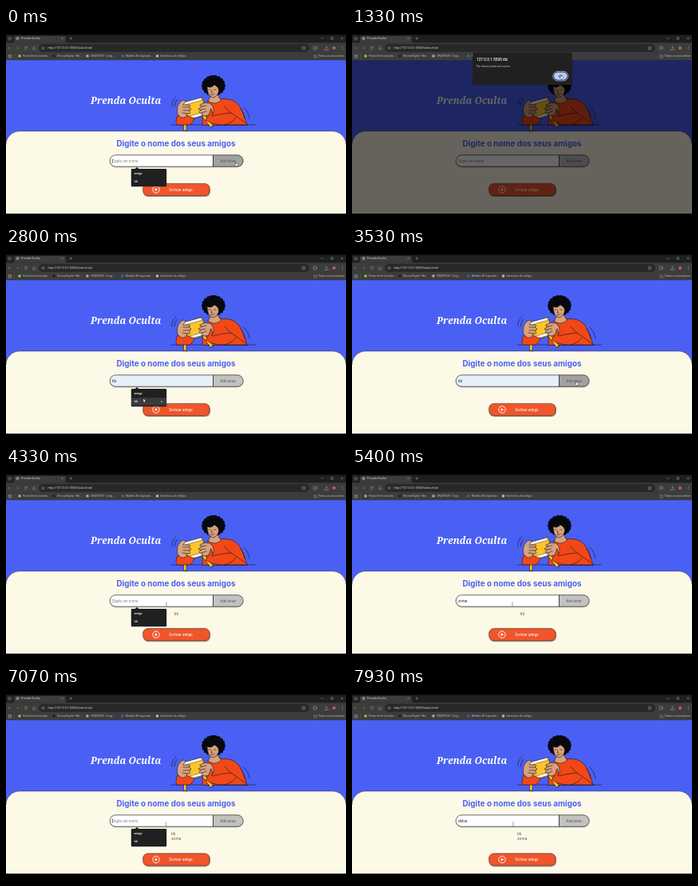
An HTML page for the animation above (8000 ms loop, 426 by 240 pixels).

```html
<!DOCTYPE html>
<html lang="pt-BR">
<head>
<meta charset="utf-8">
<title>Prenda Oculta</title>
<style>
html, body { margin: 0; width: 100%; height: 100%; overflow: hidden; background: #000; }
svg { display: block; width: 100%; height: 100%; }
text { font-family: Inter, sans-serif; font-size: 4.4px; white-space: pre; }
.chrome text { font: 3.4px Roboto, sans-serif; fill: #bdbdbd; }
.chrome .title { font-size: 3.8px; fill: #d4d4d4; }
.chrome .url { font-size: 3.85px; fill: #d8d8d8; }
.icons { fill: none; stroke: #a4a4a4; stroke-width: .5; }
.art { stroke: #15151f; stroke-width: .6; stroke-linejoin: round; stroke-linecap: round; }
.line { fill: none; }
.small { font: 600 3.6px Roboto, sans-serif; fill: #e4e4e4; }
</style>
</head>
<body>
<svg viewBox="0 0 426 240">
  <rect width="426" height="240"/>

  <g id="page">
    <rect y="40" width="426" height="192" fill="#4a60f4"/>
    <path d="M0 232V146A17 17 0 0 1 17 129H409A17 17 0 0 1 426 146V232Z" fill="#fdf9e7"/>
    <path d="M0 146A17 17 0 0 1 17 129H409A17 17 0 0 1 426 146" fill="none" stroke="#111" stroke-width=".4"/>
    <text x="150.2" y="95.3" text-anchor="middle" fill="#fff" style="font:italic 900 11.9px 'Noto Serif',serif">Prenda Oculta</text>

    <g class="art">
      <path class="line" d="M207 121H312"/>
      <path d="M246 121L247 99Q253 89 264 89Q279 87 287 92Q296 98 302 121Z" fill="#f24818"/>
      <path d="M253 91Q257 87 256 80H266Q265 87 270 90Q261 98 253 91Z" fill="#d9a27c"/>
      <g id="hair" stroke="none" fill="#08080f"></g>
      <path d="M252 73Q257 76 261 71Q267 74 266.5 79Q265 86 259 87Q252 85 252 73Z" fill="#d9a27c"/>
      <path class="line" d="M254 77.5l2-.5M261 77l2 .3M258 78l-1 3h2M256.5 83.5q3 1 5-1"/>
      <path d="M220.5 93.5L246 86.5L251.5 108.5L226.5 116Z" fill="#ffc42a"/>
      <path d="M222 93.3L244.5 87.1L245.3 90.3L222.8 96.5ZM225.3 111.5L250 104.6L250.8 107.8L226.2 114.8Z" fill="#fff" stroke-width=".4"/>
      <path d="M223 111L222.4 129L224.2 127.5L226 129.5L226 114M249 109Q255 116 260 123L258 122.5L257 125Q251 117 246 111Z" fill="#ffc42a"/>
      <path d="M217 107Q211 114 214 121H230Q236 117 236 113L226 109Z" fill="#f24818"/>
      <path d="M215 108Q213 98 218 93Q222 88 225 92L222 96L230 96Q232 98 229 99L232 101Q232 103 229 103L231 106Q230 108 227 107Q226 113 220 112Z" fill="#d9a27c"/>
      <path class="line" d="M222 99l7 0M222 103h7M221 106l6 1"/>
      <path d="M260 106Q261 97 255 94Q249 92 243 96Q242 98 246 98L241 101Q241 103 245 102L242 105Q242 107 246 106L245 109Q249 111 254 109Z" fill="#d9a27c"/>
      <path class="line" d="M246 98l5-1M245 102l5-1M246 106l5-2"/>
      <path d="M257 101Q260 105 258 110Q270 107 282 106L303 121H272Q259 121 250 115L254 109Z" fill="#f24818"/>
      <path class="line" d="M282 106Q276 102 274 98M274 121Q285 118 288 112"/>
      <path class="line" d="M213 86Q207 91 208 98M215 89Q211 93 211 98M294 101Q298 106 299 113M298 99Q304 105 305 113"/>
    </g>

    <text x="213" y="148.3" text-anchor="middle" fill="#4a60f4" style="font-size:9.9px;font-weight:700">Digite o nome dos seus amigos</text>

    <path d="M137.3 160H290a7.2 7.2 0 0 1 0 14.4H137.3a7.2 7.2 0 0 1 0-14.4Z" fill="#000" opacity=".2"/>
    <path id="field" d="M259.5 158.8H137.3A7.2 7.2 0 0 0 137.3 173.2H259.5Z" stroke="#1c1c1c" stroke-width=".65"/>
    <text id="value" x="133" y="167.6"></text>
    <path id="caret" d="M133.2 163.5v5.5" stroke="#111" stroke-width=".5"/>
    <path id="add" d="M259.5 158.8H290A7.2 7.2 0 0 1 290 173.2H259.5Z" stroke="#1c1c1c" stroke-width=".65"/>
    <text x="278.2" y="167.6" text-anchor="middle" fill="#555">Adicionar</text>

    <g fill="#555">
      <text id="first" y="183.7" style="font-size:4.8px">titi</text>
      <text id="second" x="207" y="189.7" style="font-size:4.8px">zoma</text>
    </g>

    <g id="draw">
      <rect x="172" y="195.6" width="84" height="15.4" rx="6.2" fill="#55352a" opacity=".5"/>
      <rect x="171.6" y="194.4" width="83.6" height="15.2" rx="6.2" fill="#f0552b" stroke="#222" stroke-width=".5"/>
      <circle cx="188" cy="202" r="4.2" fill="none" stroke="#fff" stroke-width=".9"/>
      <path d="M186.8 199.9L190.1 202L186.8 204.1Z" fill="#fff"/>
      <text x="219" y="203.7" text-anchor="middle" fill="#fff" style="font-weight:500">Sortear amigo</text>
    </g>

    <g id="menu">
      <path d="M161 176.5L164 174L167 176.5Z" fill="#202020"/>
      <rect x="156.8" y="175.9" width="44.4" height="22.4" rx="1.2" fill="#202020"/>
      <g id="hoverRow">
        <rect x="157" y="187.2" width="44" height="9.4" fill="#3b3b3b"/>
        <path d="M194 191l2 2m0-2l-2 2" stroke="#ddd" stroke-width=".45"/>
      </g>
      <text class="small" x="160.5" y="183.4">amigo</text>
      <text class="small" x="160.5" y="193.2">titi</text>
    </g>
  </g>

  <rect id="dim" y="40" width="426" height="192" opacity=".6"/>

  <g class="chrome">
    <rect y="8.5" width="426" height="10" fill="#1f2020"/>
    <path d="M8 18.5Q10 18.5 10 16V12Q10 10 12 10H73Q75 10 75 12V16Q75 18.5 77 18.5Z" fill="#3c3c3c"/>
    <rect y="18.3" width="426" height="21.9" fill="#3c3c3c"/>
    <rect x="41" y="20" width="339" height="10" rx="5" fill="#282828"/>
    <rect x="2" y="10.5" width="5.5" height="5.5" rx="1.5" fill="#3c3c3c"/>
    <text class="title" x="19" y="14.3">Prenda Oculta</text>
    <text class="url" x="52.5" y="26.3">http://127.0.0.1:5500/index.html</text>
    <g class="icons">
      <path d="M3.5 12.7l1.3 1.3 1.3-1.3M69.5 12l2 2m0-2l-2 2M79.5 13h3.4m-1.7-1.7v3.4"/>
      <path d="M394.5 13h3M407 11.7h2.6v2.6h-2.6ZM419.8 11.7l2.6 2.6m0-2.6l-2.6 2.6"/>
      <path d="M6 25H3m1.5-1.5l-1.5 1.5 1.5 1.5M13 25h3m-1.5-1.5l1.5 1.5-1.5 1.5" opacity=".6"/>
      <path d="M26.3 24a1.7 1.7 0 1 0 .2 1.7M26.6 22.8v1.4h-1.4M33.2 25l2-1.8 2 1.8M33.8 25v1.9h2.8V25"/>
      <path d="M385.2 23.2h3.2v3.7h-3.2ZM388.4 24.2h1.1v1.4h-1.1M401.5 22.3v3.2m-1.5-1.4l1.5 1.5 1.5-1.5M399.2 26v1.4h4.6V26"/>
      <path d="M373 22.6l.7 1.6 1.7.1-1.3 1.1.5 1.7-1.6-1-1.6 1 .5-1.7-1.3-1.1 1.7-.1Z"/>
      <circle cx="14.5" cy="13" r="1.6" fill="#888"/>
      <circle cx="46.5" cy="25" r="1.6"/><path d="M46.5 24.7v1.1"/>
      <path d="M3 33.5h1.4v1.4H3ZM5.4 33.5h1.4v1.4H5.4ZM3 35.8h1.4v1.4H3ZM5.4 35.8h1.4v1.4H5.4Z"/>
      <path d="M10.5 33v5" opacity=".4"/>
      <path d="M386 33.7h1.2l.6.6h1.6v2.7H386Z"/>
    </g>
    <circle cx="411" cy="25" r="2.1" fill="#b0654c"/>
    <path d="M421.5 22.9v.7m0 1.1v.7m0 1.1v.7" stroke="#ccc" stroke-width=".7"/>
    <g id="bookmarks"></g>
    <text x="391.5" y="36.3">Todos os marcadores</text>
  </g>

  <g id="dialog">
    <rect x="151" y="30.5" width="125" height="40.5" rx="2.5" fill="#202020"/>
    <text x="156" y="41.2" fill="#f4f4f4" style="font:500 4.7px Roboto,sans-serif">127.0.0.1:5500 diz</text>
    <text x="156" y="49.2" fill="#d0d0d0" style="font:3.7px Roboto,sans-serif">Por favor, insira um nome.</text>
    <rect x="251.8" y="54.3" width="19" height="11.6" rx="5.8" fill="none" stroke="#a8c7fa" stroke-width=".8"/>
    <rect id="ok" x="253" y="55.5" width="16.6" height="9.2" rx="4.6"/>
    <text x="261.3" y="61.6" text-anchor="middle" fill="#1b3b6f" style="font:500 3.8px Roboto,sans-serif">OK</text>
  </g>

  <g id="cursor">
    <path id="arrow" d="M0 0V4.8L1.1 3.8L1.9 5.5L2.7 5.1L1.9 3.5H3.4Z" fill="#fff" stroke="#000" stroke-width=".4"/>
    <path id="beam" d="M-.8-2H.8M0-2V2M-.8 2H.8" fill="none" stroke="#333" stroke-width=".4"/>
    <path id="hand" d="M-.5-1.6Q0-2.2.5-1.6V.3L2.4.8Q2.8 1 2.7 1.7L2.2 3.6H-.5L-1.9 1.6Q-1.8.8-.5 1.7Z" fill="#fff" stroke="#111" stroke-width=".4"/>
  </g>
</svg>

<script>
const LOOP = 8000;
const $ = id => document.getElementById(id);
const show = (id, on) => { $(id).style.display = on ? '' : 'none'; };
const within = (t, from, to) => t >= from && t < to;

// Curly hair: a ring of overlapping puffs around a solid core
let puffs = '<circle cx="260" cy="72" r="12.5"/>';
for (let i = 0; i < 18; i++) {
  const a = i / 18 * 2 * Math.PI;
  puffs += `<circle cx="${260 + 12.3 * Math.cos(a)}" cy="${72 + 10.5 * Math.sin(a)}" r="2.6"/>`;
}
$('hair').innerHTML = puffs;

$('bookmarks').innerHTML = [
  [17, '#91c95a', 'Pasta Verde (estudo...'],
  [60, '#202020', 'Oficina Digital - Ma...'],
  [102, '#a9a9a9', 'CRIATIVOS - Cong...'],
  [146, '#2f63b8', 'Modelo 3D inspirado...'],
  [189.5, '#b9b9b9', 'Exercícios de código...'],
].map(([x, color, label]) =>
  `<circle cx="${x}" cy="35" r="1.8" fill="${color}"/><text x="${x + 4}" y="36.3">${label}</text>`).join('');

// Pointer stops: time, x, y
const stops = [
  [0, 288, 169], [650, 288, 169], [1200, 262, 60], [1640, 262, 60],
  [2040, 195, 168], [2180, 195, 168], [2600, 172, 188], [3000, 172, 188],
  [3500, 281, 168], [3760, 281, 168], [4120, 201, 170], [5500, 201, 170],
  [5980, 280, 168], [6340, 280, 168], [6730, 200, 170], [8000, 202, 170],
];

function pointerAt(t) {
  const i = Math.max(1, stops.findIndex(s => s[0] > t));
  const [t0, x0, y0] = stops[i - 1], [t1, x1, y1] = stops[i];
  const p = (t - t0) / (t1 - t0), e = p * p * (3 - 2 * p);
  return [x0 + (x1 - x0) * e, y0 + (y1 - y0) * e];
}

const typed = (word, t, start, step) => word.slice(0, Math.max(0, Math.floor((t - start) / step) + 1));

function valueAt(t) {
  if (within(t, 2600, 3660)) return 'titi';
  if (within(t, 4550, 6250)) return typed('zoma', t, 4550, 170);
  if (t >= 7250) return typed('delva', t, 7250, 120);
  return '';
}

function render(t) {
  const [x, y] = pointerAt(t);
  const alertOpen = within(t, 470, 1600);
  const menuOpen = t < 400 || within(t, 2100, 2960) || within(t, 4200, 4550) || within(t, 6850, 7250);
  const count = (t >= 3660) + (t >= 6250);
  const value = valueAt(t);
  const inRow = y > 158 && y < 174;
  const overAdd = !alertOpen && inRow && x > 259 && x < 298;
  const overField = !alertOpen && inRow && x > 130 && x <= 259;
  const overOk = alertOpen && x > 252 && x < 271 && y > 54 && y < 66;

  $('value').textContent = value || 'Digite um nome';
  $('value').setAttribute('fill', value ? '#111' : '#777');
  $('field').setAttribute('fill', within(t, 2600, 3660) ? '#e6effa' : '#fff');
  $('add').setAttribute('fill', overAdd ? '#a1a1a1' : '#c2c2c0');
  $('ok').setAttribute('fill', overOk ? '#b5cff8' : '#a8c7fa');
  $('first').setAttribute('x', count > 1 ? 207 : 210.8);
  $('draw').setAttribute('transform', `translate(0 ${count * 6.2})`);
  $('cursor').setAttribute('transform', `translate(${x} ${y})`);

  show('caret', menuOpen && !value && t % 1000 < 330);
  show('first', count > 0);
  show('second', count > 1);
  show('menu', menuOpen);
  show('hoverRow', menuOpen && y > 186);
  show('dim', alertOpen);
  show('dialog', alertOpen);
  show('hand', overAdd || overOk);
  show('beam', overField);
  show('arrow', !overAdd && !overOk && !overField);
}

const start = performance.now();
function tick() {
  render((performance.now() - start) % LOOP);
  requestAnimationFrame(tick);
}
tick();
</script>
</body>
</html>
```
